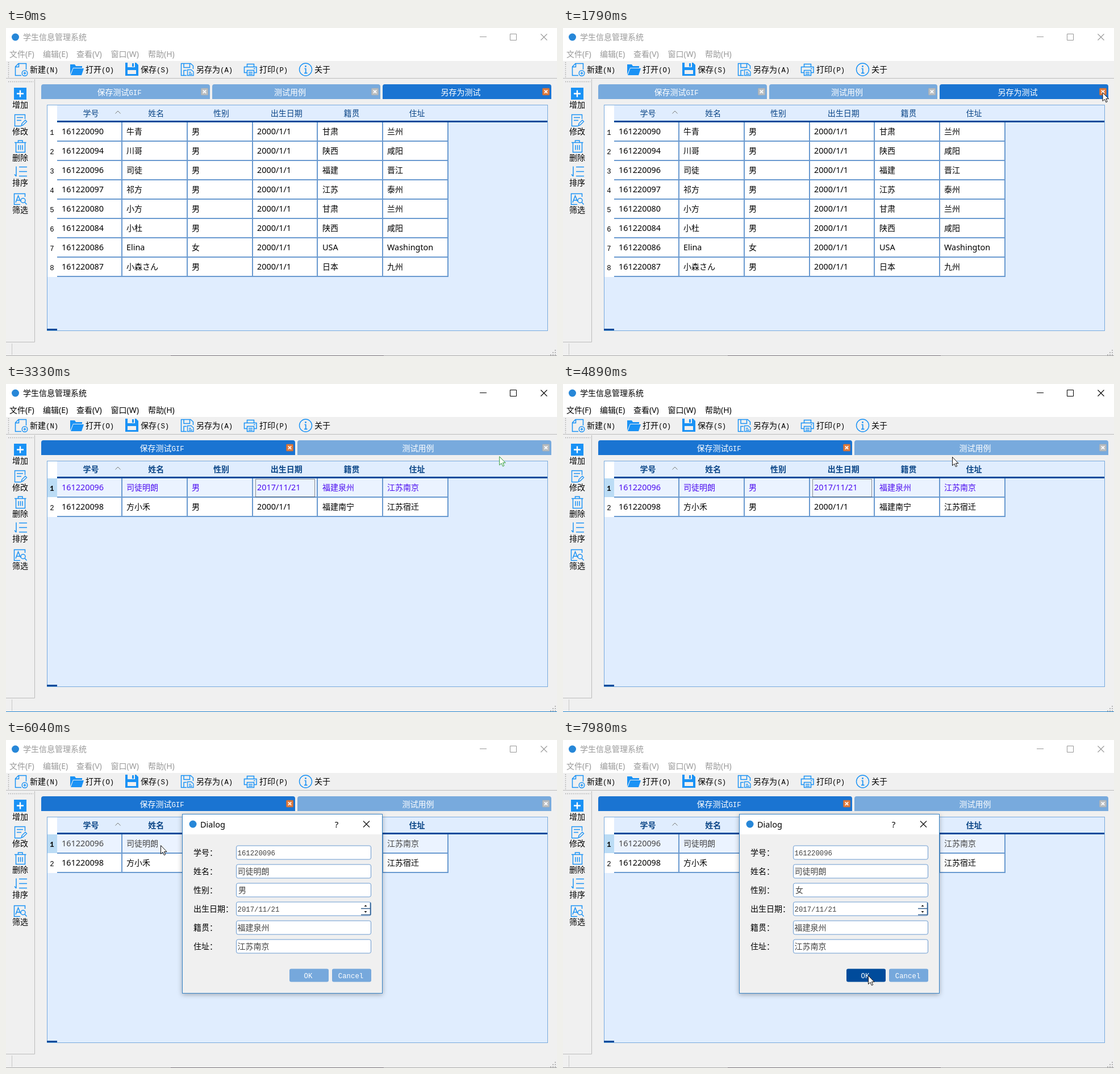
An HTML page for the animation above (8000 ms loop, 970 by 577 pixels).

```html
<!DOCTYPE html>
<html lang="zh-CN">
<head>
<meta charset="utf-8">
<style>
html, body { margin: 0; width: 100%; height: 100%; overflow: hidden; background: #f0f0f0; }
svg { display: block; width: 970px; height: 577px; }
text { white-space: pre; font: 14px "Noto Sans CJK SC", "Noto Sans CJK", "Noto Sans", sans-serif; }
.lat { font-family: "Noto Sans", "Open Sans", sans-serif; }
.mono { font-family: "Liberation Mono", "DejaVu Sans Mono", monospace; }
</style>
</head>
<body>
<svg id="stage" viewBox="0 0 970 577" xmlns="http://www.w3.org/2000/svg"></svg>
<script>
const LOOP = 8000, STEP = 77.2, MOVE_START = 640;
const TAB_SWITCH = 2330, TABLE_SWITCH = 2480, DIALOG_OPEN = 6040, POPUP_OPEN = 6650, POPUP_CLOSE = 7280;
const BLUE = '#1a74d2', PALE = '#78aadd', NAVY = '#004b9b', GRID = '#6a9ad0', ICON = '#1a92f5', SKY = '#e0edfe';
const stage = document.getElementById('stage');

// Pointer path: time, x, y
const PATH = [
  [640, 664, 505], [950, 790, 330], [1250, 905, 110], [1410, 957, 24],
  [1640, 958, 32], [1790, 949.5, 113], [1805, 949.5, 113], [1950, 948, 122],
  [2100, 948, 114], [2870, 948, 114], [3020, 911, 120], [3180, 890, 124],
  [3330, 870, 127], [3480, 848, 129], [3640, 737, 134], [3790, 733, 130],
  [3940, 733, 130], [4100, 730, 118], [4260, 690, 118], [4500, 474, 132],
  [4720, 640, 120], [4875, 685, 128], [4900, 685, 128], [4970, 688, 133],
  [5040, 686, 122], [5190, 650, 120], [5430, 330, 123], [5500, 295, 140],
  [5650, 270, 159], [5670, 270, 159], [5810, 272, 182], [5890, 272, 185],
  [6190, 272, 185], [6500, 461, 271], [6830, 461, 271], [7050, 462, 294],
  [7200, 462, 294], [7600, 534, 401], [7820, 537, 412], [7970, 537, 414]
];

const HEADS = ['学号', '姓名', '性别', '出生日期', '籍贯', '住址'];
const CLASS_ROWS = [
  '90 牛青 男 甘肃 兰州', '94 川哥 男 陕西 咸阳', '96 司徒 男 福建 晋江', '97 祁方 男 江苏 泰州',
  '80 小方 男 甘肃 兰州', '84 小杜 男 陕西 咸阳', '86 Elina 女 USA Washington', '87 小森さん 男 日本 九州'
].map(line => {
  const [id, name, sex, from, home] = line.split(' ');
  return ['1612200' + id, name, sex, '2000/1/1', from, home];
});
const SAVED_ROWS = [
  ['161220096', '司徒明朗', '男', '2017/11/21', '福建泉州', '江苏南京'],
  ['161220098', '方小禾', '男', '2000/1/1', '福建南宁', '江苏宿迁']
];

const rect = (x, y, w, h, fill, more = '') =>
  `<rect x="${x}" y="${y}" width="${w}" height="${h}" fill="${fill}" ${more}/>`;
const path = (d, stroke, width = 1, fill = 'none', more = '') =>
  `<path d="${d}" stroke="${stroke}" stroke-width="${width}" fill="${fill}" ${more}/>`;
const circle = (x, y, r, fill, more = '') => `<circle cx="${x}" cy="${y}" r="${r}" fill="${fill}" ${more}/>`;
const colX = i => Math.round(89.5 + 114.7 * i);
const inside = (p, x, y, w, h) => !!p && p.x >= x && p.x < x + w && p.y >= y && p.y < y + h;

// Latin runs get their own face and size next to the 14px Chinese text.
function label(x, y, s, { fill = '#000', mid = false, bold = false, mono = false, size = 14 } = {}) {
  const runs = s.split(/([ -~]+)/).filter(Boolean).map(run => /^[ -~]/.test(run)
    ? `<tspan class="${mono ? 'mono' : 'lat'}" style="font-size:${mono ? 12.3 : size}px">${run}</tspan>`
    : run).join('');
  return `<text x="${x}" y="${y}" fill="${fill}"${mid ? ' text-anchor="middle"' : ''}` +
    `${bold ? ' style="font-weight:bold"' : ''}>${runs}</text>`;
}

function pointerAt(t) {
  if (t < MOVE_START || (t > 1470 && t < 1630)) return null;
  let i = PATH.findIndex(k => k[0] > t);
  if (i < 0) return { x: 537, y: 414 };
  i = Math.max(i, 1);
  const [t0, x0, y0] = PATH[i - 1], [t1, x1, y1] = PATH[i];
  const f = Math.max(0, (t - t0) / (t1 - t0));
  return { x: x0 + (x1 - x0) * f, y: y0 + (y1 - y0) * f };
}

function titleBar(active, menuActive, closeHot) {
  const ink = active ? '#000' : '#999';
  let s = rect(0, 0, 970, 58, '#fff') + circle(16.5, 16, 6.5, '#2787d8') +
    label(30, 21, '学生信息管理系统', { fill: ink });
  if (closeHot) s += rect(924, 0, 46, 30, '#e81123');
  s += path('M834 15.5H846M887.5 10.5H898.5V21.5H887.5Z', ink) +
    path('M941.5 10.5L952.5 21.5M952.5 10.5L941.5 21.5', closeHot ? '#fff' : ink, 1.1);
  [[6, '文件(F)'], [65, '编辑(E)'], [124, '查看(V)'], [184.5, '窗口(W)'], [250, '帮助(H)']]
    .forEach(([x, m]) => s += label(x, 50.5, m, { fill: menuActive ? '#000' : '#999' }));
  return s;
}

function toolbars() {
  let s = path('M0 88.5H970M50.5 90V552.5H0', '#bcbcbc') +
    path('M4.5 60V87M4 94.5H48', '#a0a0a0', 1.4, 'none', 'stroke-dasharray="1.4 2.2"');
  [[42, '新建(N)'], [140, '打开(O)'], [237, '保存(S)'], [335, '另存为(A)'], [446, '打印(P)'], [543, '关于']]
    .forEach(([x, m]) => s += label(x, 77.5, m, { mono: true }));
  [[140, '增加'], [187, '修改'], [233, '删除'], [277, '排序'], [325, '筛选']]
    .forEach(([y, m]) => s += label(25, y, m, { mid: true }));
  const ink = (d, w = 1.5) => path(d, ICON, w);
  s += ink('M27 83.5H16.5V68L22 62.5H35.5V73M16.5 68.5H22.5V62.5') +
    circle(33, 79.5, 4.8, '#f0f0f0', `stroke="${ICON}" stroke-width="1.4"`) + ink('M30.5 79.5H35.5M33 77V82', 1.3);
  s += path('M113 82V64H121L123 67H134V70H118Z', 'none', 0, ICON) + path('M118.5 71H137L133 83H114Z', 'none', 0, ICON);
  s += path('M210 61H229L233 65V84H210Z', 'none', 0, ICON) +
    rect(214, 61, 13, 8, '#f0f0f0') + rect(222, 62, 3, 6, ICON) + rect(214, 74, 15, 7, '#f0f0f0');
  s += ink('M318 83.5H308.5V62.5H325L329.5 66.5V72M313 62.5V69.5H323.5V62.5M313 83V74.5H318') +
    ink('M319.5 73.5H326L330 77V83.5H319.5ZM322 78H326M322 81H328', 1.3);
  s += ink('M424.5 68V63.5H436.5V68M424 78.5H419.5V68.5H441V78.5H436.5M424.5 74.5H436.5V83.5H424.5ZM427 78H434M427 81H434M436 71.5H438.5');
  s += circle(527.5, 73, 11, 'none', `stroke="${ICON}" stroke-width="1.4"`) +
    circle(527.5, 67.5, 1.4, ICON) + ink('M525.5 71.5H527.7V79M525 79.3H530.5', 1.7);
  s += rect(14, 105, 22, 21, ICON) + path('M25 109.5V121.5M19 115.5H31', '#fff', 2.4);
  s += ink('M26 172.5H15.5V152.5H33.5V160M19 157.5H30M19 162.5H27M27 172L28 168L34 162L36.5 164.5L30.5 170.5Z', 1.4);
  s += ink('M15 201.5H35.5M21.5 201V198H29V201M17.5 202V218.5H33.5V202M22 206V214.5M25.5 206V214.5M29 206V214.5');
  s += ink('M23 244.5H37M23 252.5H37M23 260.5H37M18 243.5V260.5M15 257.5L18 261');
  s += ink('M25 310.5H14.5V291.5H33.5V297M17 307L21.5 295L25.5 305M18.5 303H24') +
    circle(30, 303.5, 4, 'none', `stroke="${ICON}" stroke-width="1.5"`) + ink('M33 306.5L36.5 310.5');
  return s;
}

function tabBar(names, current, p) {
  const pitch = 902 / names.length;
  return names.map((name, i) => {
    const x = Math.round(62 + i * pitch), r = Math.round(58 + (i + 1) * pitch), on = i === current;
    const hot = inside(p, x, 99, r - x, 26);
    const cx = r - 9.5;
    return path(`M${x} 125V103Q${x} 99 ${x + 4} 99H${r - 4}Q${r} 99 ${r} 103V125Z`, 'none', 0, on || hot ? BLUE : PALE) +
      label((x + r) / 2 - 11, 117.5, name, { fill: '#fff', mid: true, mono: true }) +
      rect(cx - 6, 106, 12, 12, on ? '#e07a3c' : '#b9bdc0', `rx="1" stroke="${on ? '#b9683c' : '#a5acb2'}" stroke-width=".7"`) +
      path(`M${cx - 2.7} 109.3l5.4 5.4m0 -5.4l-5.4 5.4`, '#fff', 1.7);
  }).join('');
}

function table(rows, selected, active, p) {
  const bottom = 166 + 34 * rows.length;
  let s = rect(72.5, 135.5, 881, 397, SKY, `stroke="${PALE}"`) + rect(73, 136, 17, bottom - 136, '#fff');
  HEADS.forEach((h, i) => {
    const hot = inside(p, colX(i), 136, 115, 28);
    if (hot) s += rect(colX(i), 136, 115, 28, BLUE);
    s += label(92 + 114.8 * (i + .5), 155, h, { fill: hot ? '#fff' : '#0b4687', mid: true, bold: selected });
  });
  s += path('M192.5 150.5L197 146L201.5 150.5', '#777') + rect(90, 163, 863, 3, NAVY) + rect(72, 529, 18, 3, NAVY);
  rows.forEach((row, r) => {
    const y = 166 + 34 * r, sel = selected && r === 0;
    s += rect(90, y, 688, 34, sel ? '#ebf3ff' : '#fff');
    if (sel) s += rect(73, y, 17, 33, '#bbdcf5');
    s += label(81, y + 22, String(r + 1), { mid: true, mono: true, bold: sel });
    row.forEach((v, c) => s += label([98, 212, 327, 442, 557, 671][c], y + 21, v,
      { size: 14.4, fill: sel ? (active ? '#4d0ef0' : '#444') : '#000' }));
    s += rect(90, y + 32, 689, 2, GRID);
  });
  HEADS.forEach((_, i) => s += rect(colX(i + 1) - 1, 166, 2, bottom - 166, GRID));
  if (selected && active) s += path('M439.5 167.5H543.5V198.5H439.5Z', '#222', 1, 'none', 'stroke-dasharray="1 1"');
  return s;
}

function dialog(t, p) {
  const picked = t >= POPUP_CLOSE;
  const [id, name, sex, born, from, home] = SAVED_ROWS[0];
  const values = [id, name, picked ? '女' : sex, born, from, home];
  let s = rect(310.5, 130.5, 352, 315, '#f0f0f0', 'stroke="#3784c6" filter="url(#soft)"') +
    rect(311, 131, 351, 35, '#fff') + circle(329, 148, 6.5, '#2787d8') +
    label(342, 153.5, 'Dialog', { size: 14.5 }) + label(582, 153.5, '?', { mid: true, size: 15 }) +
    path('M629 142.5L640 153.5M640 142.5L629 153.5', '#111', 1.2);
  values.forEach((v, i) => {
    const y = 186 + 33 * i;
    s += label(330, y + 17, HEADS[i] + '：') +
      rect(405.5, y, 237, 24, '#fff', `rx="3" stroke="${GRID}"`) +
      label(i === 2 ? 409 : 407.5, y + 17, v, { mono: true, fill: '#444' });
  });
  s += path('M625 296.5H642M625 307.5H642M641.5 286V308', '#35618f', 1.5) +
    path('M630.5 293L633 290L635.5 293ZM630.5 301L633 304L635.5 301Z', 'none', 0, '#222');
  [[499, 'OK', 532], [574, 'Cancel', 607]].forEach(([x, m, cx]) =>
    s += rect(x, 402.5, 69, 23, inside(p, x, 403, 69, 22) ? NAVY : '#76a8dc', 'rx="3"') +
      label(cx, 419, m, { fill: '#fff', mid: true, mono: true }));
  if (t >= POPUP_OPEN && !picked) {
    const second = p.y > 290;
    s += rect(409, 280, 236, 27.5, '#777') + rect(405.5, 276.5, 237, 28, '#fff', 'stroke="#7a9cc0"') +
      rect(406, second ? 290 : 276, 236, 14.5, '#0078d7') +
      label(409, 288, '男', { fill: second ? '#444' : '#fff' }) +
      label(409, 302.5, '女', { fill: second ? '#fff' : '#1aa038' });
  }
  return s;
}

function cursor(p, t) {
  const green = (t > 3170 && t < 3470) || (t > 5560 && t < 5730);
  return path('M.5 .5V15.5L4 12.3L6.4 17.6L8.7 16.6L6.4 11.5H11Z', green ? '#2c9a35' : '#111', 1, '#fff',
    `transform="translate(${p.x} ${p.y})"`);
}

function frame(active) {
  let s = path('M10.5 555V575', '#c8c8c8');
  for (let row = 0; row < 3; row++)
    for (let col = 0; col <= row; col++) s += rect(966 - 4 * col, 566 + 4 * row, 2, 2, '#b4b4b4');
  return s + rect(0, 576, 970, 1, active ? '#2485cf' : '#a9a9a9') + (active ? '' : rect(290, 576, 375, 1, '#777078'));
}

function draw(t) {
  const p = pointerAt(t);
  const early = t < TAB_SWITCH - 8, old = t < TABLE_SWITCH - 8, modal = t >= DIALOG_OPEN - 8;
  const active = !early && !modal, hover = modal ? null : p;
  const tabs = early ? ['保存测试GIF', '测试用例', '另存为测试'] : ['保存测试GIF', '测试用例'];
  stage.innerHTML = '<defs><filter id="soft" x="-10%" y="-10%" width="120%" height="120%">' +
    '<feDropShadow dx="0" dy="2" stdDeviation="4" flood-color="#000" flood-opacity=".3"/></filter></defs>' +
    rect(0, 0, 970, 577, '#f0f0f0') +
    titleBar(active, active && !old, t > 1320 && t < 1630) + toolbars() +
    tabBar(tabs, early ? 2 : 0, hover) +
    table(old ? CLASS_ROWS : SAVED_ROWS, !old, active, hover) + frame(active) +
    (modal ? dialog(t, p) : '') + (p ? cursor(p, t) : '');
}

const start = performance.now();
let last = null;
function tick() {
  const t = (performance.now() - start) % LOOP;
  const step = t < MOVE_START ? -1 : Math.floor((t - MOVE_START + 14) / STEP);
  if (step !== last) {
    last = step;
    draw(step < 0 ? 0 : MOVE_START + step * STEP);
  }
  requestAnimationFrame(tick);
}
tick();
</script>
</body>
</html>
```
